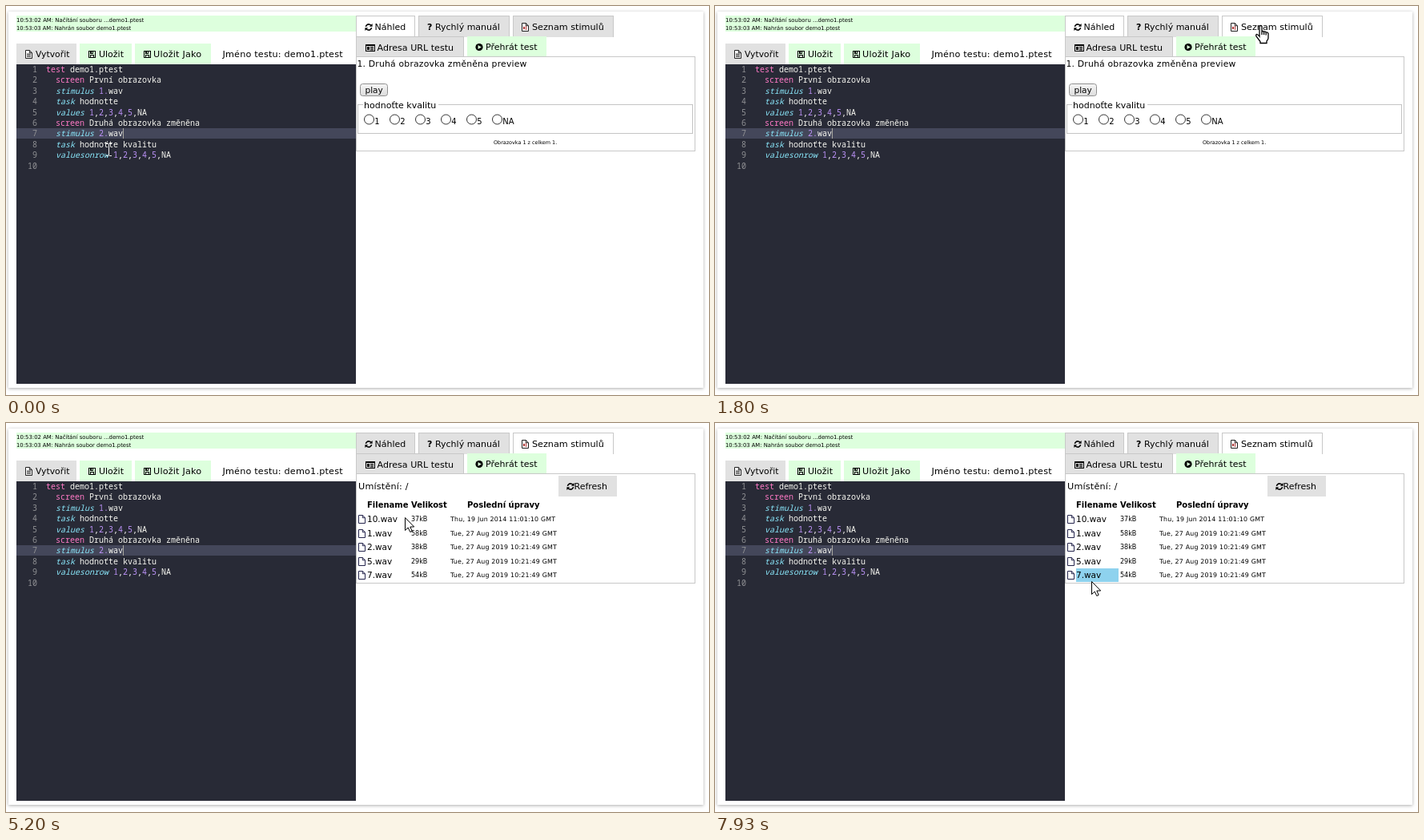
An HTML page with a canvas that plays this animation: 878 by 487 pixels, repeating every 8 s.

```html
<!DOCTYPE html>
<html lang="cs">
<head>
<meta charset="utf-8">
<title>Editor testu</title>
<style>
html, body { margin: 0; width: 100%; height: 100%; overflow: hidden; background: #fff; }
canvas { display: block; }
</style>
</head>
<body>
<canvas id="stage" width="878" height="487"></canvas>
<script>
const ctx = document.getElementById('stage').getContext('2d', { alpha: false });
const LOOP = 8000, STEP = 200 / 3, FADE = 200;
const SANS = '"DejaVu Sans", sans-serif', MONO = '"Noto Sans Mono", monospace';
const GRAY = '#e1e1e1', GREEN = '#ddffdd', LINE = '#c8c8c8', INK = '#000';

const code = [
  'test demo1.ptest', '  screen První obrazovka', '  stimulus 1.wav', '  task hodnotte',
  '  values 1,2,3,4,5,NA', '  screen Druhá obrazovka změněna', '  stimulus 2.wav',
  '  task hodnoťte kvalitu', '  valuesonrow 1,2,3,4,5,NA', ''
];
const files = [
  ['10.wav', '37kB', 5267, 6333], ['1.wav', '58kB', 6333, 7100], ['2.wav', '38kB', 7100, 7400],
  ['5.wav', '29kB', 7400, 7733], ['7.wav', '54kB', 7733, 9000]
];
// pointer path: time, x, y
const path = [
  [0, 128, 180], [667, 128, 180], [800, 165, 187], [933, 440, 110], [1067, 585, 66],
  [1133, 612, 57], [1267, 633, 52], [1400, 652, 45], [1533, 672, 32], [1600, 681, 24],
  [4467, 681, 24], [4667, 660, 40], [4867, 600, 80], [5067, 525, 112], [5200, 498, 118],
  [5333, 476, 121], [6133, 476, 121], [6333, 474, 129], [6667, 473, 142], [6867, 473, 142],
  [7000, 473, 145], [7200, 472, 155], [7400, 471, 166], [7667, 471, 181], [7733, 470, 190],
  [7867, 470, 198], [8000, 470, 198]
];
const handShape = new Path2D('M5 1.5Q5 .5 6.5 .5T8 1.5V8Q9 7 10.5 8.2Q12 7.4 13 9Q15.5 8.5 16 10.5V16Q16 18 14 20V22.5H6V20.5L1 14Q0 11.5 2 11.5Q3.5 12 5 14ZM8 8V12M10.6 8.5V12M13.2 9.3V12.5');
const arrowShape = new Path2D('M.5 .5V16.5L4.2 13L6.8 18.5L9.2 17.3L6.8 12H11.7Z');
const pageShape = new Path2D('M.5 .5H5.3L8.5 3.7V10.5H.5ZM5.3 .5V3.7H8.5');

const clamp = v => Math.max(0, Math.min(1, v));
const fade = (t, start) => clamp((t - start) / FADE);

function rect(x, y, w, h, color) {
  ctx.fillStyle = color;
  ctx.fillRect(x, y, w, h);
}

function frame(x, y, w, h, color) {
  ctx.lineWidth = 1;
  ctx.strokeStyle = color;
  ctx.strokeRect(x + .5, y + .5, w - 1, h - 1);
}

function text(str, x, y, size = 11, color = INK, font = SANS, style = '') {
  ctx.font = `${style} ${size}px ${font}`;
  ctx.fillStyle = color;
  ctx.fillText(str, x, y);
}

// the same font, set slightly wider
function looseText(...args) {
  ctx.letterSpacing = '.2px';
  text(...args);
  ctx.letterSpacing = '0px';
}

function place(x, y, draw) {
  ctx.save();
  ctx.translate(x, y);
  draw();
  ctx.restore();
}

function faded(alpha, draw) {
  ctx.save();
  ctx.globalAlpha *= alpha;
  draw();
  ctx.restore();
}

function shape(p, x, y, fill, stroke, width = 1) {
  place(x, y, () => {
    ctx.fillStyle = fill;
    ctx.fill(p);
    ctx.lineWidth = width;
    ctx.strokeStyle = stroke;
    ctx.stroke(p);
  });
}

function pageIcon(x, y, mark) {
  shape(pageShape, x, y, '#fff', '#222');
  if (mark) for (let i = 0; i < 3; i++) rect(x + 2, y + 4.5 + i * 1.7, 5, 1, mark);
}

function saveIcon(x, y) {
  frame(x, y, 9, 9, INK);
  rect(x + 2, y + 1, 4, 3, INK);
  rect(x + 4, y + 1, 1, 2, GREEN);
  rect(x + 2, y + 5, 5, 1, INK);
  rect(x + 2, y + 5, 1, 3, INK);
  rect(x + 6, y + 5, 1, 3, INK);
}

function refreshIcon(x, y) {
  for (const turn of [0, Math.PI]) place(x, y, () => {
    ctx.rotate(turn);
    ctx.strokeStyle = ctx.fillStyle = INK;
    ctx.lineWidth = 1.6;
    ctx.beginPath();
    ctx.arc(0, 0, 3.6, Math.PI * 1.05, Math.PI * 1.8);
    ctx.stroke();
    ctx.beginPath();
    ctx.moveTo(4.6, -4.5);
    ctx.lineTo(4.6, -.7);
    ctx.lineTo(.8, -.7);
    ctx.fill();
  });
}

function playIcon(x, y) {
  ctx.fillStyle = INK;
  ctx.beginPath();
  ctx.arc(x, y, 4.6, 0, 7);
  ctx.fill();
  ctx.fillStyle = GREEN;
  ctx.beginPath();
  ctx.moveTo(x - 1.5, y - 2.5);
  ctx.lineTo(x + 2.8, y);
  ctx.lineTo(x - 1.5, y + 2.5);
  ctx.fill();
}

function cardIcon(x, y) {
  frame(x, y, 12, 9, INK);
  rect(x, y, 12, 2, INK);
  rect(x + 2, y + 3, 3, 4, INK);
  for (let i = 0; i < 3; i++) rect(x + 6, y + 3 + i * 1.7, 4, 1, INK);
}

function tab(x, y, w, h, white = 0) {
  rect(x, y, w, h, GRAY);
  faded(white, () => rect(x, y, w, h, '#fff'));
  rect(x, y, w, 1, LINE);
  rect(x, y, 1, h, LINE);
  rect(x + w - 1, y, 1, h, LINE);
}

function drawCard() {
  rect(0, 0, 878, 487, '#fff');
  ctx.save();
  ctx.shadowColor = 'rgba(0,0,0,.32)';
  ctx.shadowBlur = 4;
  ctx.shadowOffsetY = 1;
  rect(3, 7, 868, 471, '#fff');
  ctx.restore();
}

function drawEditor() {
  rect(13, 12, 424, 20, GREEN);
  text('10:53:02 AM: Načítání souboru ...demo1.ptest', 13, 20, 6.9);
  text('10:53:03 AM: Nahrán soubor demo1.ptest', 13, 30, 6.8);

  rect(13, 47, 75, 26, GRAY);
  rect(92, 47, 65, 26, GREEN);
  rect(161, 47, 95, 26, GREEN);
  pageIcon(24, 55, '#333');
  saveIcon(103, 56);
  saveIcon(172, 56);
  text('Vytvořit', 37, 64, 10.8);
  text('Uložit', 116, 64);
  looseText('Uložit Jako', 184, 64, 11.2);
  looseText('Jméno testu: demo1.ptest', 270.5, 64, 11.2);

  rect(13, 73, 424, 400, '#282a36');
  rect(13, 153, 424, 13, '#44475a');
  code.forEach((row, i) => {
    const y = Math.round(83 + i * 13.4), num = String(i + 1);
    text(num, 39 - num.length * 6, y, 10, '#909194', MONO);
    const [, indent, word, rest] = row.match(/^(\s*)(\S*)(.*)$/);
    const pink = word === 'test' || word === 'screen';
    let x = 50 + indent.length * 6;
    text(word, x, y, 10, pink ? '#ff79c6' : '#8be9fd', MONO, pink ? '' : 'italic');
    x += word.length * 6;
    for (const part of (pink ? [rest] : rest.match(/\d+\.?|\D+/g) || [])) {
      text(part, x, y, 10, /^\d/.test(part) ? '#bd93f9' : '#f8f8f2', MONO);
      x += part.length * 6;
    }
  });
  rect(146, 153, 1, 13, '#a8a8a0');
}

function drawTabs(t) {
  tab(437, 12, 74, 27, 1 - fade(t, 3600));
  refreshIcon(453, 26.5);
  text('Náhled', 460.5, 30);
  tab(515, 12, 114, 27);
  text('?', 526, 30, 11, INK, SANS, 'bold');
  text('Rychlý manuál', 536, 30);
  tab(633, 12, 126, 27, fade(t, 1600));
  pageIcon(644, 21);
  rect(646, 26, 2, 3, '#a33');
  rect(649, 25, 1, 5, '#a33');
  text('Seznam stimulů', 657, 30, 11.2);
  tab(437, 38, 135, 26);
  cardIcon(449, 48);
  text('Adresa URL testu', 463.5, 56, 11.1);

  const hover = fade(t, 1067) * (1 - fade(t, 1600));
  rect(576, 38, 99, 25, GREEN);
  faded(hover, () => rect(576, 38, 99, 25, '#bbeee2'));
  faded(1 - .45 * hover, () => {
    playIcon(591, 51.5);
    text('Přehrát test', 599, 55);
  });
}

function drawPreview() {
  frame(437, 63, 424, 119, LINE);
  looseText('1. Druhá obrazovka změněna preview', 438.5, 76, 10.8);
  const shade = ctx.createLinearGradient(0, 97, 0, 113);
  shade.addColorStop(0, '#f6f6f6');
  shade.addColorStop(1, '#dcdcdc');
  ctx.beginPath();
  ctx.roundRect(442.5, 97.5, 34, 15, 3);
  ctx.fillStyle = shade;
  ctx.fill();
  ctx.lineWidth = 1;
  ctx.strokeStyle = '#909090';
  ctx.stroke();
  text('play', 448.5, 109, 10.5);

  frame(439, 123, 419, 37, '#c4c4c4');
  rect(446, 122, 94, 3, '#fff');
  text('hodnoťte kvalitu', 447, 128);
  ['1', '2', '3', '4', '5', 'NA'].forEach((label, i) => {
    const x = 453.5 + i * 32;
    ctx.beginPath();
    ctx.arc(x, 142, 6, 0, 7);
    ctx.strokeStyle = '#333';
    ctx.stroke();
    text(label, x + 6.7, 148, 10);
  });
  text('Obrazovka 1 z celkem 1.', 609, 173, 6.45);
}

function drawFiles(t) {
  frame(437, 63, 424, 138, LINE);
  looseText('Umístění: /', 440, 83, 11.2);
  rect(690, 66, 73, 26, GRAY);
  refreshIcon(705, 79.5);
  text('Refresh', 709.5, 83);
  [['Filename', 451], ['Velikost', 506], ['Poslední úpravy', 576]]
    .forEach(([head, x]) => text(head, x, 106, 10, INK, SANS, 'bold'));
  files.forEach(([name, size, from, to], i) => {
    const top = Math.round(112 + i * 17.6), y = top + 12;
    faded(fade(t, from) * (1 - fade(t, to)), () => rect(451, top, 53, 17, '#8ed2ee'));
    shape(pageShape, 440, top + 3, '#fff', '#25254d');
    text(name, 451, y, 10.5);
    text(size, 506, y - 1, 8);
    const date = i ? 'Tue, 27 Aug 2019 10:21:49 GMT' : 'Thu, 19 Jun 2014 11:01:10 GMT';
    looseText(date, 555, y - 1, 7.9);
  });
}

function pointerAt(t) {
  const n = path.findIndex(p => p[0] > t);
  const [t0, x0, y0] = path[n - 1], [t1, x1, y1] = path[n];
  const k = (t - t0) / (t1 - t0);
  return [Math.round(x0 + (x1 - x0) * k), Math.round(y0 + (y1 - y0) * k)];
}

function drawPointer(t) {
  const [x, y] = pointerAt(t);
  const inEditor = x < 437;
  const onName = x >= 451 && x < 490 && y > 111 && y < 196;
  if (inEditor || onName) {
    const color = inEditor ? '#f4f4f4' : '#000';
    rect(x, y - 7, 1, 14, color);
    for (const dy of [-8, 7]) {
      rect(x - 3, y + dy, 3, 1, color);
      rect(x + 1, y + dy, 3, 1, color);
    }
  } else if (y < 64) {
    shape(handShape, x - 6, y, '#fff', '#000', 1.3);
  } else {
    shape(arrowShape, x, y, '#fff', '#000');
  }
}

function draw(now) {
  const t = Math.floor((now % LOOP + 5) / STEP) * STEP % LOOP;
  drawCard();
  drawEditor();
  drawTabs(t);
  if (t < 3599) drawPreview();
  else drawFiles(t);
  drawPointer(t);
}

const start = performance.now();
function tick() {
  draw(performance.now() - start);
  requestAnimationFrame(tick);
}
tick();
</script>
</body>
</html>
```
